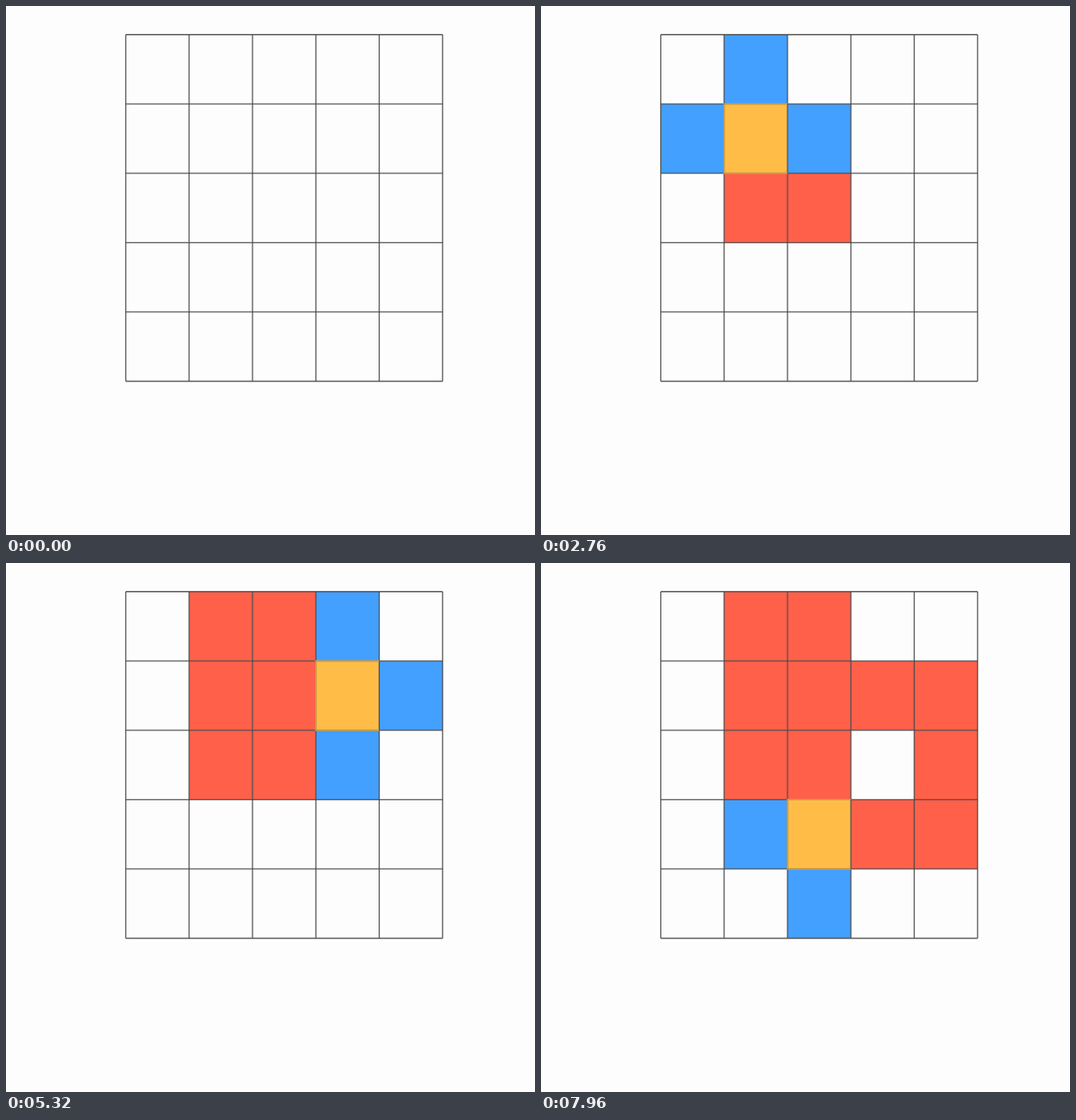
An HTML page with a canvas for the animation above (8 s loop, 720 by 720 pixels).

```html
<!DOCTYPE html>
<html>
<head>
<meta charset="utf-8">
<style>
  html, body { margin: 0; height: 100%; overflow: hidden; background: #fdfdfd; }
  canvas { display: block; }
</style>
</head>
<body>
<canvas id="stage" width="720" height="720"></canvas>
<script>
const ctx = document.getElementById('stage').getContext('2d');
const LOOP = 8000, START = 520, STEP = 603;
const N = 5, X0 = 163, Y0 = 39, W = 86.25, H = 94.35;
const BACK = '#fdfdfd', LINE = 'rgba(72,72,72,.78)';
const RED = '#ff604a', BLUE = '#44a0ff', YELLOW = '#ffbd48';

// Self-avoiding walk from the centre cell
const MOVES = { L: [-1, 0], R: [1, 0], U: [0, -1], D: [0, 1] };
const path = [[2, 2]];
for (const m of 'LUURDRRDDLL') {
  const [x, y] = path[path.length - 1];
  path.push([x + MOVES[m][0], y + MOVES[m][1]]);
}

function cell([cx, cy], color) {
  ctx.fillStyle = color;
  ctx.fillRect(X0 + cx * W, Y0 + cy * H, W, H);
}

function polyline(points, color) {
  ctx.strokeStyle = color;
  ctx.beginPath();
  points.forEach(([x, y]) => ctx.lineTo(x, y));
  ctx.stroke();
}

function grid() {
  ctx.lineWidth = 1.8;
  for (let i = 0; i <= N; i++) {
    const x = X0 + i * W, y = Y0 + i * H;
    polyline([[x, Y0], [x, Y0 + N * H]], LINE);
    polyline([[X0, y], [X0 + N * W, y]], LINE);
  }
}

// The walker's colour softens the grid lines around it, except on the right
function softEdge([cx, cy]) {
  const x = X0 + cx * W, y = Y0 + cy * H;
  ctx.globalAlpha = 0.65;
  ctx.lineWidth = 2;
  polyline([[x + W, y], [x, y], [x, y + H], [x + W, y + H]], YELLOW);
  ctx.globalAlpha = 1;
}

function openNeighbours([x, y], visited) {
  return Object.values(MOVES)
    .map(([dx, dy]) => [x + dx, y + dy])
    .filter(([a, b]) => a >= 0 && b >= 0 && a < N && b < N &&
      !visited.some(([p, q]) => p === a && q === b));
}

function draw(t) {
  ctx.fillStyle = BACK;
  ctx.fillRect(0, 0, 720, 720);
  // The first tick places the walker, the second reveals its options
  const tick = Math.floor((t - START) / STEP);
  if (tick < 0) return grid();
  const k = Math.min(Math.max(tick - 1, 0), path.length - 1);
  const visited = path.slice(0, k);
  visited.forEach(c => cell(c, RED));
  if (tick > 0) openNeighbours(path[k], visited).forEach(c => cell(c, BLUE));
  cell(path[k], YELLOW);
  grid();
  softEdge(path[k]);
}

function frame(now) {
  draw(now % LOOP);
  requestAnimationFrame(frame);
}
draw(0);
requestAnimationFrame(frame);
</script>
</body>
</html>
```
